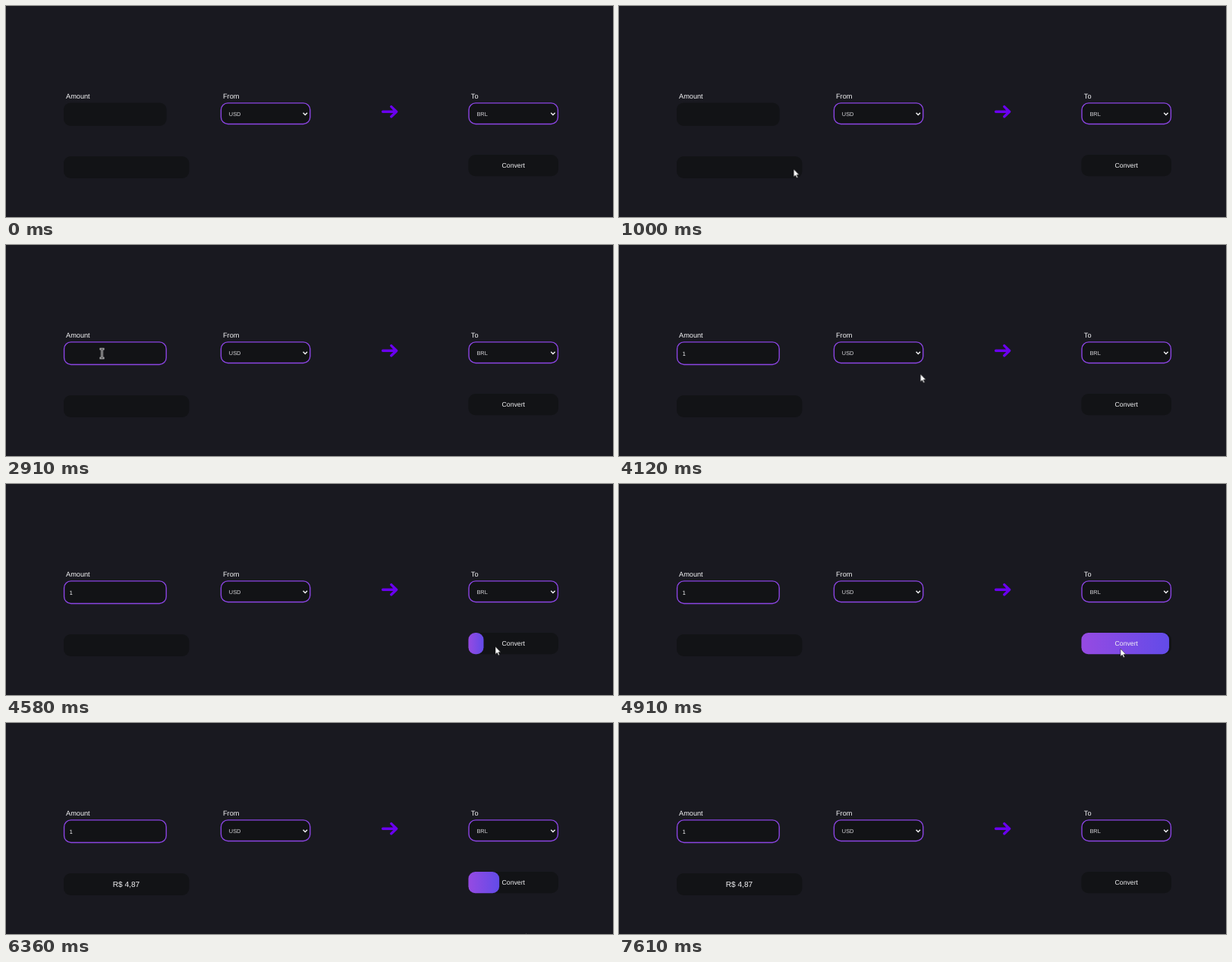
Animation of 800x278 px, one loop 7640 ms. Source, as an HTML page:

```html
<!DOCTYPE html>
<html lang="en">
<head>
<meta charset="utf-8">
<title>Currency converter</title>
<style>
html, body { margin: 0; width: 100%; height: 100%; overflow: hidden; background: #191920; }
svg { display: block; width: 800px; height: 278px; }
text { font-family: "Liberation Sans", Arial, sans-serif; fill: #f4f4f6; text-rendering: geometricPrecision; }
.label { font-size: 9.2px; }
.option { font-size: 7.4px; fill: #d6d6da; }
.typed { font-family: "DejaVu Sans", sans-serif; font-size: 7.2px; }
.button { font-size: 8.7px; text-anchor: middle; }
.result { font-size: 10.1px; }
.box { fill: #121316; }
.line { fill: none; stroke: #8b45e3; stroke-width: 1.4; }
.chevron { fill: none; stroke: #f0f0f2; stroke-width: 1.5; }
.arrow { fill: none; stroke: #6a00ef; stroke-width: 3.4; stroke-linecap: round; stroke-linejoin: round; }

.focus, .typed, .result, .pointer, .beam { animation: 7640ms step-end infinite; }
.focus { animation-name: focus; }
.typed { animation-name: typed; }
.result { animation-name: result; }
.pointer { animation-name: pointer; }
.beam { animation-name: beam; }
.hover { width: 0; animation: hover 7640ms infinite; }
.cursor { animation: move 7640ms linear infinite; }

@keyframes focus { 0% { visibility: hidden } 30.76%, 100% { visibility: visible } }
@keyframes typed { 0% { visibility: hidden } 42.54%, 100% { visibility: visible } }
@keyframes result { 0% { visibility: hidden } 71.34%, 100% { visibility: visible } }
@keyframes pointer {
  0%, 17.8% { visibility: hidden }
  9.16%, 50.4% { visibility: visible }
  83.77%, 100% { visibility: hidden }
}
@keyframes beam {
  0%, 50.4%, 100% { visibility: hidden }
  17.8% { visibility: visible }
}
@keyframes hover {
  0%, 59.03% { width: 0; animation-timing-function: ease }
  65.58%, 80.76% { width: 118.5px; animation-timing-function: ease }
  87.3%, 100% { width: 0 }
}
@keyframes move {
  0%, 9.16% { transform: translate(330px, 284px); animation-timing-function: ease-out }
  20.94%, 47.91% { transform: translate(126.5px, 143px); animation-timing-function: cubic-bezier(.4, .1, .7, .7) }
  53.93% { transform: translate(397px, 170px); animation-timing-function: cubic-bezier(.3, .3, .6, 1) }
  61.52%, 79.19% { transform: translate(661px, 217px); animation-timing-function: ease-in }
  83.77%, 100% { transform: translate(690px, 290px) }
}
</style>
</head>
<body>
<svg viewBox="0 0 800 278">
  <defs>
    <linearGradient id="glow">
      <stop offset="0" stop-color="#964ae2"/>
      <stop offset="1" stop-color="#624be8"/>
    </linearGradient>
    <g id="select">
      <rect class="box line" style="fill:#121316" width="117.4" height="27.6" rx="9"/>
      <path class="chevron" d="M108.2 12.9l2.7 2.7 2.7-2.7"/>
    </g>
  </defs>

  <text class="label" x="79" y="122.3">Amount</text>
  <rect class="box" x="76" y="127.4" width="135.6" height="30.6" rx="9"/>
  <rect class="line focus" x="76.6" y="127.9" width="134.6" height="29.6" rx="9"/>
  <text class="typed" x="83.4" y="145.8">1</text>

  <text class="label" x="286" y="122.3">From</text>
  <use href="#select" x="283.4" y="127.9"/>
  <text class="option" x="293.8" y="144.7">USD</text>

  <path class="arrow" d="M496.6 139.2H514.2M507.8 132.6L514.6 139.2L507.8 145.8"/>

  <text class="label" x="612.8" y="122.3">To</text>
  <use href="#select" x="610" y="127.9"/>
  <text class="option" x="620.4" y="144.7">BRL</text>

  <rect class="box" x="76" y="198" width="165.4" height="29" rx="9"/>
  <text class="result" x="140.8" y="215.8">R$ 4,87</text>

  <rect class="box" x="609.4" y="196" width="118.5" height="28.2" rx="9"/>
  <rect class="hover" x="609.4" y="196" height="28.2" rx="9" fill="url(#glow)"/>
  <text class="button" x="668.8" y="213.3">Convert</text>

  <g class="cursor">
    <path class="pointer" d="M0 0V10.2L2.3 8.1L3.9 11.6L5.5 10.9L3.9 7.5H7Z" fill="#fff" stroke="#111" stroke-width=".5"/>
    <g class="beam" fill="none">
      <path d="M-3 -6H3M0 -6V6M-3 6H3" stroke="#e8e8ea" stroke-width="2.6"/>
      <path d="M-2.4 -6H2.4M0 -6V6M-2.4 6H2.4" stroke="#111" stroke-width=".9"/>
    </g>
  </g>
</svg>
</body>
</html>
```
